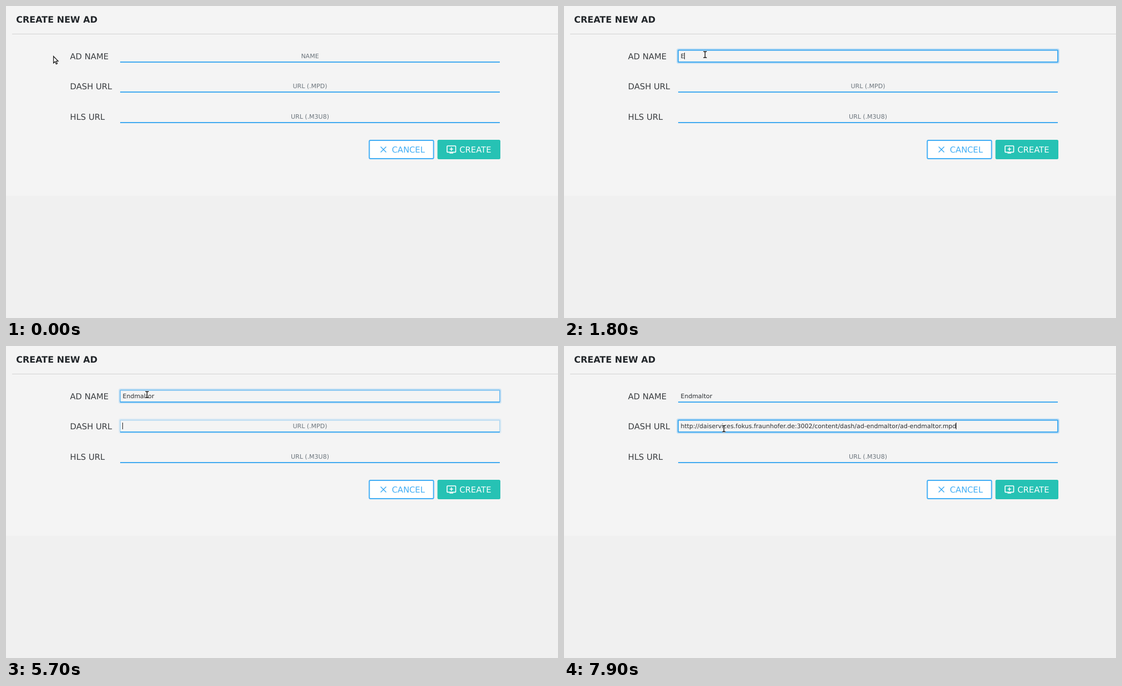
These frames come from a looping animation (996 px wide and 562 px high, 8000 ms). An HTML page:

```html
<!DOCTYPE html>
<html lang="en">
<head>
<meta charset="utf-8">
<title>Create new ad</title>
<style>
  html, body { margin: 0; width: 100%; height: 100%; overflow: hidden; background: #f0f0f0; }
  svg { display: block; width: 100%; height: 100%; }
  text { font-family: "DejaVu Sans", sans-serif; text-rendering: geometricPrecision; white-space: pre; }
  .title { font-size: 16px; font-weight: bold; fill: #212529; }
  .label { font-size: 14.8px; fill: #3a3d40; }
  .value { font-size: 11px; fill: #2b2f33; }
  .hint { font-size: 11px; fill: #6c757d; text-anchor: middle; }
  .tip { font: 11.3px "Noto Sans", sans-serif; fill: #fff; }
  .focus rect { fill: none; stroke: #42aaf0; }
</style>
</head>
<body>
<svg viewBox="0 0 996 562">
  <defs>
    <linearGradient id="tipFill" x2="0" y2="1">
      <stop stop-color="#3b3a39"/>
      <stop offset="1" stop-color="#1c1b1b"/>
    </linearGradient>
  </defs>
  <rect width="996" height="342" fill="#f4f4f4"/>
  <path d="M11 50.5H996" stroke="#d2d2d2"/>
  <text class="title" x="18.2" y="30">CREATE NEW AD</text>

  <g id="fields"></g>

  <rect x="655.5" y="242" width="116" height="33" rx="2" fill="#fff" stroke="#42aef5" stroke-width="2"/>
  <path d="M676 253.5l10 10m0-10l-10 10" stroke="#42aef5" stroke-width="1.5"/>
  <text class="label" x="696.2" y="264" style="fill:#42aef5">CANCEL</text>

  <rect x="778.5" y="241" width="113.5" height="35" rx="2.5" fill="#26c2b4"/>
  <g fill="none" stroke="#fff" stroke-width="1.6">
    <rect x="795.8" y="252" width="15.6" height="11.4" rx="1"/>
    <path d="M800.3 265h6.6M800.4 257.7h6.4m-3.2-3.2v6.4"/>
  </g>
  <text class="label" x="818.2" y="264" style="fill:#fff">CREATE</text>

  <rect id="caret" width="1" height="12" fill="#222"/>
  <g id="tooltip">
    <rect width="233" height="21" rx="4" fill="url(#tipFill)"/>
    <text class="tip" x="4" y="14.5"></text>
  </g>
  <g id="cursor">
    <path id="arrow" d="M.7 .7V12.8L3.5 10.2L5.6 14.6L7.6 13.7L5.6 9.4H9.2Z" fill="#fff" stroke="#222" stroke-width="1.3"/>
    <g id="beam" fill="none">
      <path d="M-3-5.5h2l1 1 1-1h2M-3 5.5h2l1-1 1 1h2M0-4.5v9" stroke="#fff" stroke-opacity=".75" stroke-width="3"/>
      <path d="M-3-5.5h2l1 1 1-1h2M-3 5.5h2l1-1 1 1h2M0-4.5v9" stroke="#111" stroke-width="1.4"/>
    </g>
  </g>
</svg>
<script>
const LOOP = 8000, TICK = 100, TEXT_X = 210.5;
const $ = id => document.getElementById(id);
const show = (el, on) => el.setAttribute('visibility', on ? 'visible' : 'hidden');
const place = (el, x, y) => el.setAttribute('transform', `translate(${x} ${y})`);
const within = (t, spans) => spans.some(([from, to]) => t >= from && t < to);
const ramp = (t, start) => Math.min(1, Math.max(0, (t - start) / 300));

const adName = 'Endmaltor';
const adUrl = 'http://daiservices.fokus.fraunhofer.de:3002/content/dash/ad-endmaltor/ad-endmaltor.mpd';
const keyTimes = [1800, 2200, 2300, 3900, 4100, 4200, 4400, 4600, 4700];
const caretSpans = [[800, 2000], [2200, 3100], [3900, 5500], [5700, 6900], [7900, LOOP]];
const pasteTime = 7900, switchTime = 5600;

// time, x, y of the pointer's hot spot
const pointer = [
  [0, 85, 90], [300, 112, 89], [400, 170, 88], [500, 228, 93.5], [600, 253, 93.5],
  [800, 253.5, 92], [900, 254.5, 88], [1000, 254.5, 87.5],
  [6300, 256, 87.5], [6400, 264, 108], [6500, 282, 140], [6600, 288.5, 149]
];
const tips = [
  { from: 1500, to: 1800, x: 254, y: 103, width: 139, text: 'Insert a name for the ad.' },
  { from: 7100, to: 7900, x: 288, y: 165, width: 233, text: 'Insert url which links to a DASH file (.mpd).' }
];

const fields = [['AD NAME', 'NAME', 0], ['DASH URL', 'URL (.MPD)', 54], ['HLS URL', 'URL (.M3U8)', 109]]
  .map(([label, hint, top]) => {
    const group = document.createElementNS('http://www.w3.org/2000/svg', 'g');
    place(group, 0, top);
    group.innerHTML = `
      <text class="label" x="115.5" y="95.5">${label}</text>
      <path d="M206 101H891" stroke="#42aaf0" stroke-width="2"/>
      <g class="focus">
        <rect x="205" y="78.5" width="687" height="23.5" rx="2" stroke-width="4" stroke-opacity=".3"/>
        <rect x="206" y="79.5" width="685" height="21.5" rx="1" stroke-width="2"/>
      </g>
      <text class="hint" x="548.5" y="94">${hint}</text>
      <text class="value" x="${TEXT_X}" y="94"></text>`;
    $('fields').append(group);
    const part = name => group.querySelector('.' + name);
    return { top, focus: part('focus'), hint: part('hint'), value: part('value') };
  });

function drawPointer(t) {
  const [, x, y] = pointer.filter(p => p[0] <= t).pop();
  const overField = x > 206 && x < 891 && fields.some(f => y > f.top + 79 && y < f.top + 102);
  place($('cursor'), x, y);
  show($('beam'), overField);
  show($('arrow'), !overField);
}

function drawTooltip(t) {
  const tip = tips.find(p => t >= p.from && t < p.to);
  show($('tooltip'), tip);
  if (!tip) return;
  place($('tooltip'), tip.x, tip.y);
  $('tooltip').querySelector('rect').setAttribute('width', tip.width);
  $('tooltip').querySelector('text').textContent = tip.text;
}

function draw(now) {
  const t = Math.floor(now % LOOP / TICK) * TICK;
  const typed = adName.slice(0, keyTimes.filter(k => k <= t).length);
  const values = [typed, t >= pasteTime ? adUrl : '', ''];
  const moved = ramp(t, switchTime);
  const focus = [ramp(t, 700) - moved, moved, 0];

  fields.forEach((field, i) => {
    field.value.textContent = values[i];
    show(field.hint, !values[i]);
    field.focus.setAttribute('opacity', focus[i]);
  });

  const active = fields[t > switchTime ? 1 : 0];
  const width = active.value.textContent ? active.value.getComputedTextLength() : 0;
  $('caret').setAttribute('x', Math.floor(TEXT_X + width));
  $('caret').setAttribute('y', active.top + 84);
  show($('caret'), within(t, caretSpans));

  drawTooltip(t);
  drawPointer(t);
}

const start = performance.now();
function frame() {
  draw(performance.now() - start);
  requestAnimationFrame(frame);
}
frame();
</script>
</body>
</html>
```
